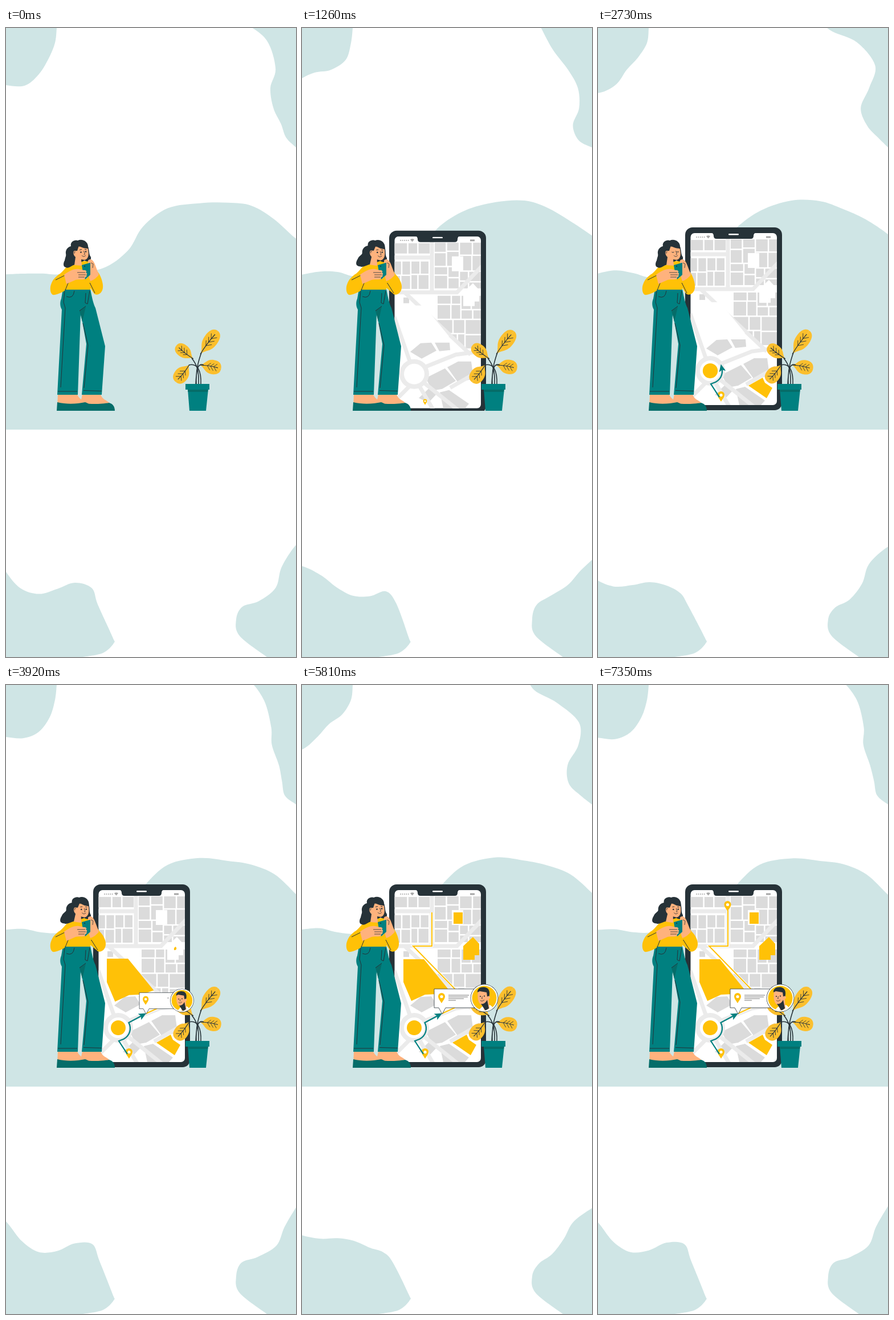
Animation of 509 by 1101 pixels, one loop 7.42 s. Source, as an HTML page with a canvas:

```html
<!DOCTYPE html>
<html lang="en">
<head>
<meta charset="utf-8">
<title>Map on a phone</title>
<style>
html, body { margin: 0; width: 100%; height: 100%; overflow: hidden; background: #fff; }
canvas { display: block; width: 509px; height: 1101px; }
</style>
</head>
<body>
<canvas id="stage" width="509" height="1101"></canvas>
<script>
const ctx = document.getElementById('stage').getContext('2d');
const LOOP = 7420, STEP = 70, SWAY = 3500, TURN = Math.PI * 2;
const DARK = '#263238', TEAL = '#008080', DEEP = '#056d69', GOLD = '#ffc107',
      SKIN = '#ffb27d', SHADE = '#cfe5e5', BLOCK = '#dbdbdb', ROAD = '#ebebeb', LEAF = '#fbbf2d';

const clamp = v => Math.max(0, Math.min(1, v));
const span = (t, a, b) => clamp((t - a) / (b - a));
const backOut = p => 1 + 2.7 * (p - 1) ** 3 + 1.7 * (p - 1) ** 2;
const pop = (t, a, b) => t < a ? 0 : backOut(span(t, a, b));
const wave = t => Math.sin(t / SWAY * TURN);

function fill(color, d) {
  ctx.fillStyle = color;
  ctx.fill(new Path2D(d));
}
function stroke(color, w, d) {
  ctx.strokeStyle = color;
  ctx.lineWidth = w;
  ctx.stroke(new Path2D(d));
}
function disc(color, x, y, r) {
  ctx.fillStyle = color;
  ctx.beginPath();
  ctx.arc(x, y, r, 0, TURN);
  ctx.fill();
}
function rect(color, x, y, w, h, r = 0) {
  ctx.fillStyle = color;
  ctx.beginPath();
  ctx.roundRect(x, y, w, h, r);
  ctx.fill();
}
function at(x, y, angle, scale, draw) {
  if (scale <= 0) return;
  ctx.save();
  ctx.translate(x, y);
  ctx.rotate(angle);
  ctx.scale(scale, scale);
  draw();
  ctx.restore();
}
const grow = (x, y, s, draw) => at(x, y, 0, s, () => {
  ctx.translate(-x, -y);
  draw();
});

// A wave runs along each edge, fading out towards its pinned end.
// lag and step are in degrees, per point along the edge.
const blobs = [
  { edge: '89,0 86,26 74,54 52,75 28,90 0,100 -25,104', close: '-25,0', amp: 14, lag: 20, step: -58, pin: 1 },
  { edge: '509,209 489,194 476,170 474,140 477,105 475,70 449,30 417,0 395,-22', close: '509,-22',
    amp: 13, lag: -474, step: 75, pin: 0 },
  { edge: '135,1101 170,1094 189,1077 187,1066 162,1009 147,986 120,983 90,983 60,980 30,970 0,952 -20,936',
    close: '-20,1101', amp: 13, lag: -10, step: -62, pin: 3 },
  { edge: '458,1101 410,1064 404,1035 414,1012 440,998 467,975 483,945 509,917 530,898', close: '530,1101',
    amp: 10, lag: -223, step: 52, pin: 2 },
  { edge: '-20,433 28,427 62,430 100,434 168,420 212,388 242,349 285,317 340,304 390,305 430,314 470,334 509,365 530,384',
    close: '530,703 -20,703', amp: 3, lag: -107, step: 100, pin: -3, beat: 2 }
];
const points = s => s.split(' ').map(p => p.split(',').map(Number));
for (const b of blobs) {
  b.edge = points(b.edge);
  b.close = points(b.close);
}

function drawBlob({ edge, close, amp, lag, step, pin, beat = 1 }, t) {
  const near = (list, i) => list[Math.max(0, Math.min(list.length - 1, i))];
  const pts = edge.map(([x, y], i) => {
    const [ax, ay] = near(edge, i - 1), [bx, by] = near(edge, i + 1);
    const phase = t / SWAY * TURN * beat - (lag + step * i) * Math.PI / 180;
    const d = amp * clamp((i - pin) / 3) * Math.cos(phase) / Math.hypot(bx - ax, by - ay);
    return [x - (by - ay) * d, y + (bx - ax) * d];
  });
  const handle = (i, sign) => pts[i].map((v, k) => v + sign * (near(pts, i + 1)[k] - near(pts, i - 1)[k]) / 6);
  ctx.fillStyle = SHADE;
  ctx.beginPath();
  ctx.moveTo(...pts[0]);
  for (let i = 1; i < pts.length; i++) ctx.bezierCurveTo(...handle(i - 1, 1), ...handle(i, -1), ...pts[i]);
  for (const p of close) ctx.lineTo(...p);
  ctx.fill();
}

// City blocks: districts split again and again by narrow lanes
let seed = 11;
const random = () => (seed = seed * 16807 % 2147483647) / 2147483647;
const city = [];
function split(x, y, w, h) {
  const cut = .4 + random() * .25, lane = 2.5;
  if (Math.max(w, h) < 27) city.push([x, y, w, h]);
  else if (w > h) {
    split(x, y, w * cut - lane, h);
    split(x + w * cut, y, w - w * cut, h);
  } else {
    split(x, y, w, h * cut - lane);
    split(x, y + h * cut, w, h - h * cut);
  }
}
split(162, 371, 62, 18);
split(162, 403, 60, 48);
split(233, 370, 81, 80);
split(238, 463, 76, 92);

const FIELD = 'M178 480H214L258 534L237 541L216 542L192 553L178 520Z';
const PLOT = 'M264 626L289 612L293 621L306 630L296 648Z';
const HOUSE = 'M283 457L300 441L311 453V473H303V481H283Z';

function drawCity() {
  rect('#fff', 162, 359, 152, 301);
  for (const b of city) rect(BLOCK, ...b);
  fill('#fff', 'M172 460H185L300 566H172Z' + HOUSE);
  rect('#fff', 263, 394, 20, 26);
  fill(BLOCK, 'M190 561L208 546L227 545L236 559L210 573ZM233 545H259L260 558L241 560Z' +
    'M217 607L251 590L270 612L246 626L229 629ZM255 588L274 578H297L301 608L274 615Z' +
    'M205 642L226 622L239 632L222 650ZM242 632L258 628L293 652L286 660H248ZM178 466H188V476H178Z');
  stroke(ROAD, 7, 'M162 396H230M228 359V457M162 457H272L316 411M180 457L296 566' +
    'M162 500L190 580M215 588L270 566L316 560M192 618L160 650M206 621L230 662M210 612L275 664M260 624L312 594');
  disc(ROAD, 197, 600, 26);
  disc('#fff', 197, 600, 18);
  fill('#fff', FIELD + PLOT);
}

function drawHighlights(t) {
  grow(285, 630, pop(t, 2050, 2550), () => fill(GOLD, PLOT));
  grow(197, 600, pop(t, 2500, 3100), () => disc(GOLD, 197, 600, 13));
  grow(212, 516, pop(t, 3150, 4060), () => fill(GOLD, FIELD));
  grow(297, 461, pop(t, 3900, 4500), () => fill(GOLD, HOUSE));
  grow(274, 408, pop(t, 4550, 5100), () => rect(GOLD, 266, 398, 16, 20));
}

// Draws the first part of a polyline and returns its tip
function trail(pts, p, color, w) {
  const len = pts.slice(1).map(([x, y], i) => Math.hypot(x - pts[i][0], y - pts[i][1]));
  let left = p * len.reduce((sum, l) => sum + l, 0);
  let tip = [...pts[0], 0];
  ctx.strokeStyle = color;
  ctx.lineWidth = w;
  ctx.beginPath();
  ctx.moveTo(tip[0], tip[1]);
  for (let i = 0; i < len.length && left > 0; i++) {
    const f = Math.min(1, left / len[i]), [x, y] = pts[i], [X, Y] = pts[i + 1];
    tip = [x + (X - x) * f, y + (Y - y) * f, Math.atan2(Y - y, X - x)];
    ctx.lineTo(tip[0], tip[1]);
    left -= len[i];
  }
  ctx.stroke();
  return tip;
}

const nearWay = points('213,646 198,623');
for (let a = 1.3; a > -.5; a -= .2) nearWay.push([197 + 21 * Math.cos(a), 601 + 21 * Math.sin(a)]);
nearWay.push([238, 579]);
const farWay = points('246,575 268,565 283,547 195,457 228,457 228,393');

function pin(x, y, s) {
  at(x, y, 0, s, () => {
    fill(GOLD, 'M0 0C-3-5-6-8-6-12A6 6 0 0 1 6-12C6-8 3-5 0 0Z');
    disc('#fff', 0, -11.5, 2.6);
  });
}

function drawWays(t) {
  const far = span(t, 3700, 5850), near = span(t, 2200, 3000);
  if (far > 0) {
    trail(farWay, far, '#fff', 4);
    trail(farWay, far, GOLD, 2);
  }
  pin(216, 654, pop(t, 1200, 1600));
  if (near > 0) {
    const [x, y, angle] = trail(nearWay, near, TEAL, 2.2);
    at(x, y, angle, 1, () => fill(TEAL, 'M9 0L-4-6L-1 0L-4 6Z'));
  }
  pin(227.5, 396, pop(t, 5850, 6250));
}

function drawPhone(t) {
  ctx.save();
  ctx.beginPath();
  ctx.rect(0, 0, 509, 670);
  ctx.clip();
  ctx.translate(0, 321 * Math.exp(-t * .0032));
  rect(DARK, 153, 349, 170, 320, 13);
  ctx.save();
  ctx.beginPath();
  ctx.roundRect(162.5, 359, 151.5, 301, 7);
  ctx.clip();
  drawCity();
  drawHighlights(t);
  drawWays(t);
  ctx.restore();
  fill(DARK, 'M198 358Q203 359 203 364Q203 369 208 369H268Q273 369 273 364Q273 359 278 358Z');
  rect('#fff', 229, 360, 18, 2.4, 1.2);
  for (let i = 0; i < 5; i++) disc('#a6a6a6', 173 + i * 3.4, 366, 1);
  fill('#a6a6a6', 'M190 364.5Q193.5 362 197 364.5L193.5 368.5ZM295 364.5H303V367.5H295Z');
  ctx.restore();
}

function leaf(x, y, angle, len, w) {
  at(x, y, angle, 1, () => {
    const side = s => `M0 0C${len * .25} ${s * w * .1} ${len * .25} ${s * w / 2} ${len * .62} ${s * w / 2}` +
      `C${len * .88} ${s * w / 2} ${len} ${s * w * .3} ${len} 0Z`;
    fill(LEAF, side(1));
    fill(LEAF, side(-1));
    stroke(DARK, 1.2, `M0 0Q${len * .4} -2 ${len * .85} 0`);
    for (const k of [.35, .5, .65]) {
      const a = len * k, b = a + len * .15;
      stroke(DARK, .8, `M${b} ${-w * .25}L${a} -1L${b} ${w * .25}`);
    }
  });
}

function drawPlant(t) {
  const s = wave(t) * .015;
  leaf(341, 571, -.93 + s, 51, 25);
  leaf(329, 579, -2.49 + s, 38, 22);
  leaf(340, 590, .15 - s, 38, 25);
  leaf(322, 589, 2.23 - s, 39, 25);
  stroke(DARK, 1.6, 'M334 624C333 600 337 585 343 568M338 624C339 598 334 588 326 578' +
    'M342 624C343 600 336 586 321 590M333 624C334 600 336 585 347 590');
  fill(TEAL, 'M319 632H355L351 670H322Z');
  fill(DEEP, 'M319 633H354.5L354 637H319.5Z');
  rect(TEAL, 315, 623, 42, 10);
}

function drawHead(sway, blink) {
  const x = 101 - 5 * sway;
  grow(128, 402, 1, () => {
    ctx.translate(128, 402);
    ctx.rotate(sway * .08);
    ctx.translate(-128, -402);
    fill(DARK, 'M114 382C112 374 121 370 126 372C134 368 145 374 144 384C147 390 145 396 149 401C150 407 145 411 138 407' +
      `L122 414C115 415 110 422 ${x + 4} 419C${x - 2} 418 ${x} 410 ${x + 2} 407C${x + 3} 401 106 399 105 395C104 388 109 383 114 382Z`);
    fill(SKIN, 'M123 382L143 384C146 394 146 404 138 406L132 405L133 416L120 415L122 401C117 397 117 389 122 389Z');
    fill(DARK, 'M119 378C130 369 143 373 145 386C139 386 133 385 128 381L125 390L118 390Z');
    stroke(DARK, .8, 'M122 392Q119 390 120 395M136.5 390L138.5 396L136.5 396.5M133 398Q136 402 140 398');
    if (blink) stroke(DARK, 1, 'M129.5 392Q131.5 394 133.5 392M138 391.5Q140 393 142 391.5');
    else {
      disc(DARK, 131.5, 392.5, 1.3);
      disc(DARK, 140, 391.5, 1.3);
      stroke(DARK, 1, 'M129 388.5L133 387.5M138 387.5L141.5 388');
    }
  });
}

function drawWoman(t) {
  const sway = clamp(wave(t) * 2.5), e = sway * 5;

  fill(SKIN, 'M91 641H125C128 650 136 652 139 655L125 662H90ZM134 641H166C168 650 178 652 181 656L165 662L130 660Z');
  fill(DEEP, 'M139 657C150 659 170 658 181 656C188 658 191 663 191 670H143Z');
  fill(DEEP, 'M90 655C106 659 125 658 139 655C148 658 152 663 152 670H89Z');

  fill(TEAL, 'M100 457H148C151 473 154 485 157 490L174 557L168 642H133L141 553L134 514L131 500L126 642H90L98 493C94 486 95 478 97 474Z');
  fill(DEEP, 'M129 495L140 488L134 514Z');
  stroke(DARK, 1, 'M103 460L101 480L104 490L96 629M91 636H125M136 634.5L168 635.5M135 517L144 555L137 630' +
    'M147 460L143 483L139 481L140 464M140 487L129 495M106 470Q118 475 120 460');

  fill(GOLD, `M119 408H148L164 431C${169 + e} 441 ${172 + e} 452 ${169 + e} 459C${166 + e} 467 ${157 + e} 469 ${154 + e} 464` +
    'L148 455V458H102L104 459C97 464 86 468 82 467C77 464 77 454 79 449C82 440 88 434 95 430C104 422 110 412 119 408Z');
  drawHead(sway, t >= 2660 && t < 2870);
  stroke(DARK, 1, `M87 441L103 433M104 459L110 444M${147 + e / 2} 446L${156 + e} 464`);

  fill(SKIN, 'M102 432C110 426 119 421 128 422L143 425L144 437C138 442 128 439 122 441L106 448Z' +
    'M144 407C149 402 154 407 157 416L163 432C159 437 154 441 148 443L145 434Z');
  fill(TEAL, 'M133 415L147 411Q150 411 149 414L148 432L139 440L136 434Z');
  fill(SKIN, 'M123 423L139 424Q143 426 140 428Q144 430 141 432Q143 435 139 436Q140 439 134 440L121 440Z');
  fill(SKIN, 'M148 411C154 412 155 416 154 423L148 437Z');
  stroke(DARK, .8, 'M125 428L139 428M127 432L140 432M127 436L138 436M149 411L153 413L152 420');
  disc(DARK, 138, 417, 1);
}

function drawAvatar() {
  disc(DARK, 320, 548, 24.4);
  disc('#fff', 320, 548, 23.7);
  disc(GOLD, 320, 548, 21.5);
  ctx.save();
  ctx.beginPath();
  ctx.arc(320, 548, 21.5, 0, TURN);
  ctx.clip();
  fill('#fff', 'M308 572L316 563L330 560L338 567V572Z');
  fill(SKIN, 'M309 536H327L329 566L320 570L317 560C310 560 307 549 309 536Z');
  fill(DARK, 'M314 558C318 559 322 557 325 551L328 566L322 570L318 564Z');
  fill(DARK, 'M308 538C307 530 317 527 324 530C330 533 330 541 328 547L325 545L324 538L312 536Z');
  ctx.restore();
  disc(SKIN, 327.5, 547, 2.5);
  disc(DARK, 313, 545, 1.1);
  disc(DARK, 320, 544.5, 1.1);
  stroke(DARK, .8, 'M316.5 545L315.5 549H317M313 552Q316 555 320 551');
}

function drawBubble(t) {
  const size = 1 - (1 - span(t, 3500, 4370)) ** 3 * 1.08;
  const write = span(t, 3880, 4700) * 2;
  grow(246, 576, size, () => {
    const box = 'M232 532H304V565H252L246 576L240 565H232Z';
    fill('#fff', box);
    stroke(DARK, .8, box);
    pin(245, 557, 1);
    [36, 34, 27, 13].forEach((w, i) => {
      const g = clamp(write - i * .3);
      rect('#777', 257 + w * (1 - g), 542.5 + i * 3, w * g, 1);
    });
    drawAvatar();
  });
}

function draw(now) {
  const t = Math.floor(now % LOOP / STEP) * STEP;
  ctx.fillStyle = '#fff';
  ctx.fillRect(0, 0, 509, 1101);
  for (const b of blobs) drawBlob(b, t);
  drawPhone(t);
  drawPlant(t);
  drawWoman(t);
  drawBubble(t);
}

let start;
function tick(now) {
  start ??= now;
  draw(now - start);
  requestAnimationFrame(tick);
}
draw(0);
requestAnimationFrame(tick);
</script>
</body>
</html>
```
